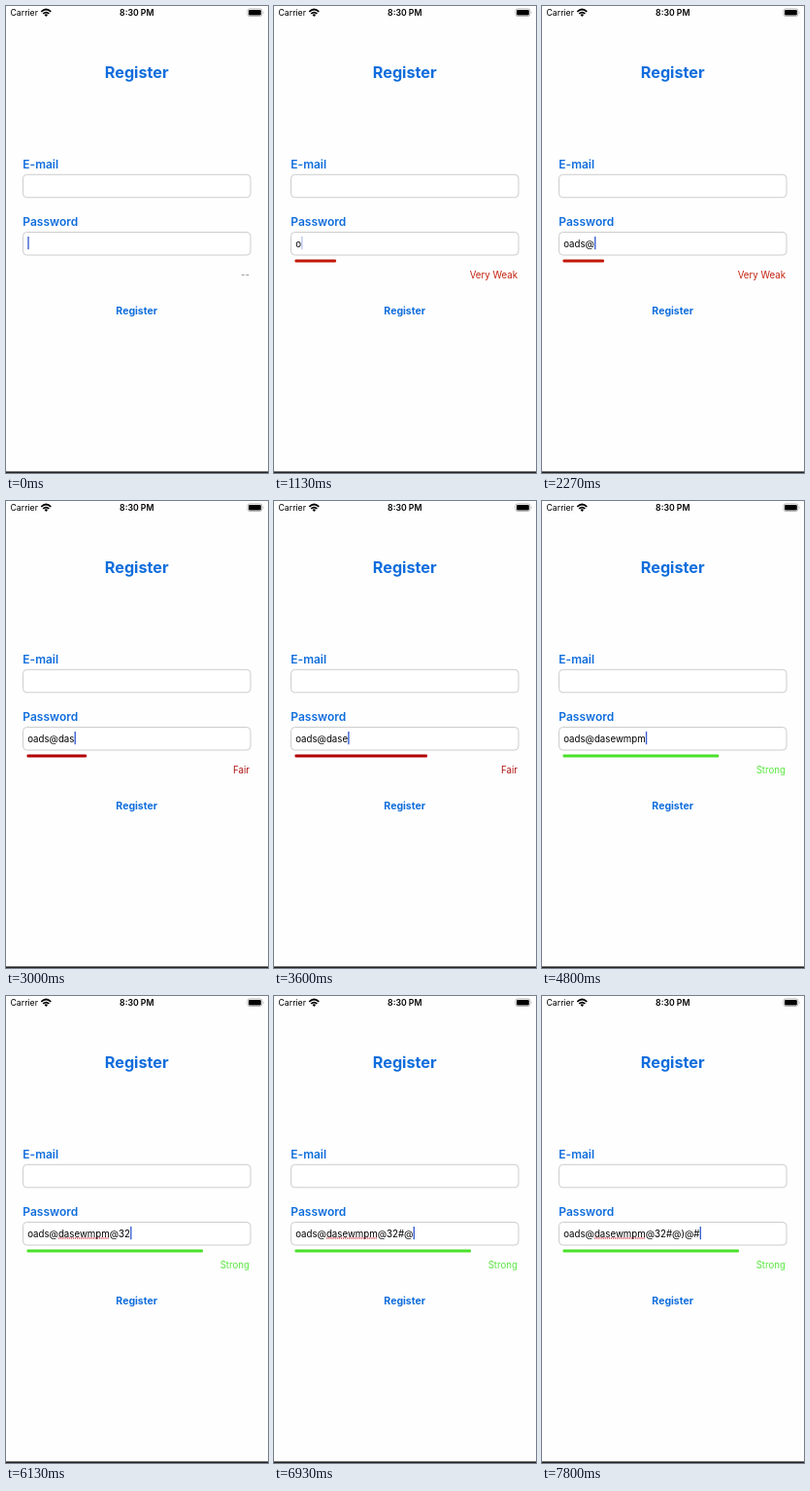
Recreate the animation shown at these times as an HTML page. Size 270 by 480 pixels, loop 8000 ms.

```html
<!DOCTYPE html>
<html lang="en">
<head>
<meta charset="utf-8">
<title>Register</title>
<style>
  html, body { margin: 0; width: 100%; height: 100%; overflow: hidden; background: #fefefe; }
  svg { display: block; width: 100%; height: 100%; }
  text { font-family: Inter, "Open Sans", sans-serif; font-size: 9.7px; fill: #000; }
  .status { font-size: 8.7px; }
  .blue { fill: #0f6ddc; font-weight: 600; font-size: 12px; }
  .title { font-weight: 700; font-size: 16.2px; }
  .button { font-weight: 700; font-size: 10.5px; }
  .field { fill: #fff; stroke: #cdcdcd; }
</style>
</head>
<body>
<svg viewBox="0 0 270 480">
  <rect width="270" height="480" fill="#fefefe"/>

  <text class="status" x="4.5" y="10">Carrier</text>
  <g fill="none" stroke="#000" stroke-width="1.7">
    <path d="M36.3 5.8Q41.3 1.2 46.3 5.8"/>
    <path d="M38.2 7.9Q41.3 5.2 44.4 7.9"/>
  </g>
  <path d="M39.5 9Q41.3 7.6 43.1 9L41.3 10.9Z"/>
  <text class="status" x="134.8" y="10" text-anchor="middle" font-weight="600">8:30 PM</text>
  <rect x="248.9" y="2.9" width="15" height="7.6" rx="2.2" fill="none" stroke="#999" stroke-width=".7"/>
  <rect x="250" y="4" width="12.8" height="5.4" rx="1.2"/>
  <path d="M264.9 5.4Q266.2 6.7 264.9 8Z" fill="#999"/>

  <text class="blue title" x="134.7" y="73.6" text-anchor="middle">Register</text>
  <text class="blue" x="17.3" y="166.5">E-mail</text>
  <rect class="field" x="17.5" y="173.3" width="234.5" height="23.5" rx="4"/>
  <text class="blue" x="17.3" y="225.9">Password</text>
  <rect class="field" x="17.5" y="232.5" width="234.5" height="23.5" rx="4"/>
  <text class="blue button" x="134.7" y="316.5" text-anchor="middle">Register</text>

  <text id="typed" x="22.2" y="247.5"></text>
  <path id="squiggle" fill="none" stroke="#d5303c" stroke-width="1.5" stroke-linecap="round" stroke-dasharray="0 2.1"/>
  <rect id="caret" y="237" width="1.4" height="13.2" fill="#3c62d2"/>
  <rect id="bar" x="21.5" y="260.4" height="3.1" rx="1"/>
  <text id="label" x="251" y="280.4" text-anchor="end"></text>
  <rect y="478.4" width="270" height="1.6" fill="#222"/>
</svg>
<script>
const LOOP = 8000, BAR_TIME = 850, TEXT_X = 22.2, BAR_X = 21.5;
const password = "oads@dasewmpm@32#@)@#";
const keyTimes = [270, 1470, 1600, 1730, 2270, 2330, 2730, 2870, 3600, 4200, 4330,
                  4530, 4670, 5130, 6000, 6070, 6670, 6870, 7070, 7600, 7730];
const levels = [
  { at: 0, text: "--", color: "#858585" },
  { at: 270, text: "Very Weak", color: "#c4200e" },
  { at: 2730, text: "Fair", color: "#b01414" },
  { at: 4200, text: "Strong", color: "#58e63e" },
];
const bars = [
  { at: 270, end: 64, color: "#c2180a" },
  { at: 2755, end: 158, color: "#b30006" },
  { at: 4355, recolor: 4430, end: 203, color: "#4be02a" },
];
const [typed, squiggle, caret, bar, label] =
  ["typed", "squiggle", "caret", "bar", "label"].map(id => document.getElementById(id));

const clamp = x => Math.min(1, Math.max(0, x));
const ease = x => x * x * (3 - 2 * x);
const set = (el, attrs) => Object.entries(attrs).forEach(([k, v]) => el.setAttribute(k, v));

function draw(t) {
  const count = keyTimes.filter(at => at <= t).length;
  typed.textContent = password.slice(0, count);
  const width = count ? typed.getComputedTextLength() : 0;

  // The caret fades during the pause after the first key.
  set(caret, { x: TEXT_X + width + .1, opacity: t < 1470 ? 1 - clamp((t - 1000) / 200) : 1 });

  const misspelled = t >= 5200;
  if (misspelled) {
    const start = TEXT_X + typed.getSubStringLength(0, 5);
    set(squiggle, { d: `M${start + .8} 248.9h${typed.getSubStringLength(5, 8) - 1}` });
  }
  set(squiggle, { visibility: misspelled ? "visible" : "hidden" });

  const level = levels.filter(l => l.at <= t).pop();
  label.textContent = level.text;
  label.style.fill = level.color;

  let end = BAR_X, color = "none";
  for (const b of bars) {
    end += (b.end - end) * ease(clamp((t - b.at) / BAR_TIME));
    if (t >= (b.recolor || b.at)) color = b.color;
  }
  set(bar, { width: end - BAR_X, fill: color });
}

function tick() {
  draw(performance.now() % LOOP);
  requestAnimationFrame(tick);
}
tick();
</script>
</body>
</html>
```
